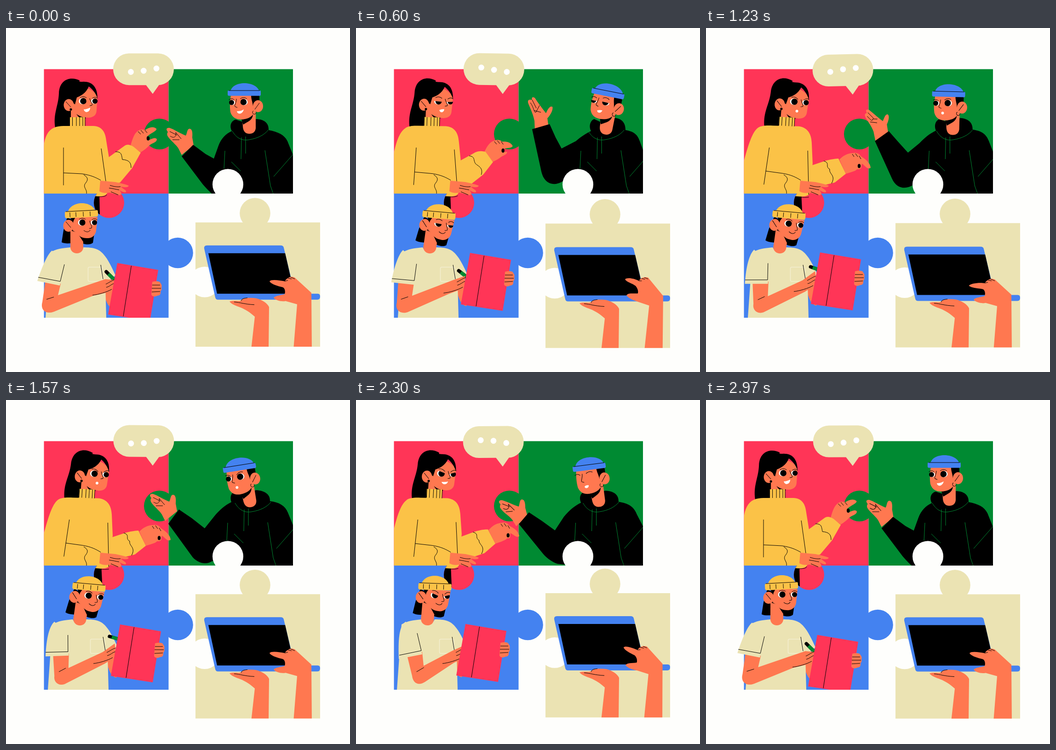
Animation, 748 px wide and 748 px high, one loop 3000 ms. Source, as an HTML page with a canvas:

```html
<!DOCTYPE html>
<html lang="en">
<head>
<meta charset="utf-8">
<title>Team puzzle</title>
<style>
html, body { margin: 0; width: 100%; height: 100%; overflow: hidden; background: #fefefc; }
canvas { display: block; }
</style>
</head>
<body>
<canvas id="stage" width="748" height="748"></canvas>
<script>
const g = document.getElementById('stage').getContext('2d');
const BG = '#fefefc', RED = '#ff3557', GREEN = '#008a32', BLUE = '#4482f0', BEIGE = '#ebe3b3',
  SKIN = '#ff7850', YELLOW = '#fbc247', BLACK = '#000', WHITE = '#fff';
const LOOP = 3000, TIMES = [0, 370, 870, 1570, 1970, 2530, LOOP];
let now = 0, step = 0, part = 0;

// Blend two numbers, or two path strings with the same commands.
function mix(a, b, w) {
  if (typeof a === 'number') return a + (b - a) * w;
  const to = b.match(/[\d.]+/g);
  let n = 0;
  return a.replace(/[\d.]+/g, x => (+x + (to[n++] - x) * w).toFixed(2));
}
// One value per key pose, blended at the current time.
const key = (...v) => mix(v[step], v[(step + 1) % 6], part);
const wave = (period, delay = 0) => Math.sin((now - delay) / period * 2 * Math.PI);

function fill(color, d) { g.fillStyle = color; g.fill(new Path2D(d)); }
function line(d, color = BLACK, width = 1) {
  g.strokeStyle = color;
  g.lineWidth = width;
  g.stroke(new Path2D(d));
}
function oval(color, x, y, rx, ry = rx) {
  g.fillStyle = color;
  g.beginPath();
  g.ellipse(x, y, rx, ry, 0, 0, 7);
  g.fill();
}
function box(color, x, y, w, h, r = 0) {
  g.fillStyle = color;
  g.beginPath();
  g.roundRect(x, y, w, h, r);
  g.fill();
}
function moved(dx, dy, draw, deg = 0, px = 0, py = 0) {
  g.save();
  g.translate(px + dx, py + dy);
  g.rotate(deg * Math.PI / 180);
  g.translate(-px, -py);
  draw();
  g.restore();
}
function within(d, draw) {
  g.save();
  g.clip(new Path2D(d));
  draw();
  g.restore();
}
function eye(x, y, r, open, slope, side = -2) {
  open = Math.max(0, Math.min(1, open));
  const top = y + r * (1.1 - 2.2 * open);
  if (open > .08) within(`M${x - 20} ${top - slope * 20}L${x + 20} ${top + slope * 20}V${y + 20}H${x - 20}Z`, () => {
    oval(WHITE, x + side, y, r * 1.05, r * .95);
    oval(BLACK, x, y, r * .95);
  });
  const lid = y - r - 2;
  line(`M${x - r} ${lid + 2 - slope * r}Q${x} ${lid - 3} ${x + r} ${lid + 2 + slope * r}`);
}

function panels() {
  box(RED, 82.5, 89.5, 271, 271);
  box(GREEN, 353.5, 89.5, 270.5, 270.5);
  box(BLUE, 82.5, 360, 271, 270);
  oval(GREEN, 333.5, 230.5, 33.5);
  oval(RED, 224, 380, 33);
  oval(BLUE, 373.5, 489, 33.3);
  box(RED, 190, 350, 70, 10);
}

function woman() {
  const lean = key(0, .06, .78, .8, 1, .35), reach = key(0, 0, 1, 1, 1, .85);
  const dx = 25.5 * lean, tilt = 6 * lean;
  const open = key(3, -1.5, 3, 1, .85, .65), slope = key(0, 0, .15, .3, .3, .35);
  const smile = 'M169 177C174 177 179 175 183 173C183 183 172 187 169 177Z',
    round = 'M172 179C172 175 178 175 178 179C178 183 172 183 172 179Z',
    flat = 'M169 177C174 178 179 180 183 180C179 182 173 181 169 177Z';

  within('M82.5 0H500V360H82.5ZM257 380A33 33 0 1 1 191 380A33 33 0 1 1 257 380Z', () => {
    // far arm
    fill(SKIN, mix(
      'M293 270L271 255C276 238 280 226 290 222C295 220 299 221 302 222C311 216 320 213 327 219C329 224 313 229 306 237L309 245C317 240 326 237 328 242C328 249 318 250 312 255C305 262 300 266 293 270Z',
      'M304 317L290 286C298 278 306 273 318 272C328 270 333 273 337 279C346 285 357 292 358 304C351 309 346 299 339 295L338 301C338 306 334 308 329 307C326 309 324 311 320 312C315 314 310 315 304 317Z', reach));
    oval(BLACK, mix(309, 333, reach), mix(240, 300, reach), 3.2, 4.5);
    line(mix('M287 225L293 231M293 222L299 229M302 222L307 228', 'M318 274L322 280M325 273L330 280M333 278L337 285', reach));
    fill(YELLOW, mix(
      'M222 282L258 256C264 252 270 254 277 258L293 271L274 305L248 336L216 345Z',
      'M226 300L262 288C275 285 282 284 288 284L304 317L280 336L255 342L216 340Z', reach));
    line(mix('M238 269C252 269 251 276 253 286C266 287 272 291 272 304', 'M256 289C271 294 258 301 269 307C267 318 283 320 273 338', reach));

    moved(dx, 0, () => {
      fill(BLACK, 'M160 114C140 104 116 112 115 142C114 170 102 186 107 217L142 214L155 160Z');
      fill(SKIN, 'M141 165V198H172L168 185Z');
      fill(BLACK, 'M153 187C160 192 168 195 174 195L166 201C161 196 156 192 153 187Z');
      fill(SKIN, 'M146 150V180C156 191 170 195 180 195C192 194 197 188 197 178L199 150C190 130 160 120 146 150Z');
      fill(BLACK, 'M130 160C124 130 140 114 165 117C186 115 199 127 199 153C195 141 188 133 180 127C174 142 162 148 154 151L150 166L141 160Z');
      oval(SKIN, 136.5, 167.5, 11, 13);
      line('M130 160L141 172');
      oval(BLACK, 141, 177, 2.6);
      eye(168, 159, 7.2, open, slope);
      eye(193.5, 159, 6, open, -slope);
      line('M182 153C183 160 189 164 187 168L182 169');
      fill(WHITE, key(smile, smile, round, round, flat, smile));
    }, tilt, 155, 210);

    // trousers and hem showing in the tab
    fill(BLACK, mix('M188 355H203L204 405H188Z', 'M188 355H208L211 408H188Z', lean));
    fill(YELLOW, mix('M190 350H220C224 362 214 368 194 366Z', 'M190 350H228C228 362 226 369 194 366Z', lean));
    line(mix('M194 366C210 368 218 366 219 362', 'M194 366C206 368 216 370 225 369', lean));

    fill(YELLOW, mix(
      'M82 258C84 236 92 222 104 217C110 214 118 213 125 213L190 213C208 214 216 225 218 245L224 282L217 360L82 360Z',
      'M82 300C95 255 103 230 113 219C118 212 135 211 150 212L205 214C222 217 232 228 233 250L234 298L226 360L82 360Z', lean));
    line(mix('M125 260L125 342M207 262L217 333', 'M141 260L126 340M225 268L225 370', lean));
    line(mix('M125 315L165 317C185 320 195 325 206 331', 'M131 310L168 316C185 319 195 324 206 331', lean));
    line('M169 319C178 325 179 329 174 336C165 346 177 350 175 360');

    fill(SKIN, 'M205 332L238 335C250 338 262 340 267 343C265 348 257 346 249 345L260 353C264 360 255 358 246 352C254 360 251 365 244 363L225 358C215 360 208 358 203 355Z');
    line('M226 342C235 345 241 346 249 345M224 348C232 349 240 351 246 352M228 356L244 363');

    moved(dx, 0, () => {
      box(YELLOW, 138, 194, 34, 20);
      line('M138.500 194V213M144.500 194V213M153 194V213M160 194V213M167 194V213M172 194V213');
    }, tilt * .7, 155, 210);
  });
}

function man() {
  const open = key(3, -1.5, 3, 1.3, 1, -1.5), slope = key(0, 0, -.1, .3, .3, 0);
  const palm = 'M382 276L408 255L405 238C406 228 405 219 399 219C394 219 394 228 391 234C380 230 365 220 355 217C349 217 347 220 352 226C348 232 352 236 356 241C362 248 370 254 375 262Z',
    raised = 'M386 232L417 228L413 199C420 192 426 180 424 174C418 171 413 181 410 188C404 180 392 165 386 155C381 151 378 154 380 159C372 157 369 160 372 168C377 180 382 190 385 205Z';
  const creases = 'M356 225L372 233M357 235C364 240 371 238 369 227L381 241M362 243L377 243',
    folds = 'M380 159L389 177M376 165C384 176 384 188 388 186L396 171M384 182L399 186';
  const low = 'M407 254L434 274L452 284L462 256C468 240 478 230 491 224C485 212 490 202 499 199L515 204L543 198C560 198 572 206 571 222C592 226 605 232 612 246L624 276L624 360L470 360L447 360C441 354 434 347 428 340L382 279Z',
    up = 'M421 209L434 238L447 262L478 246C490 236 497 231 511 224C505 212 511 200 518 198L531 204L556 195C574 195 586 202 586 222C605 225 612 232 617 246L624 265L624 360L488 360L460 325C445 342 412 350 403 312L383 220Z',
    far = 'M376 238L404 257L432 279L452 254C464 239 476 229 490 222C486 210 490 201 499 198L516 204L544 196C562 197 575 205 574 220C594 222 607 230 613 245L624 272L624 360L484 360L449 350C437 358 420 357 406 342L353 269Z',
    rest = 'M376 248L404 266L433 286L452 254C464 240 476 230 489 224C483 212 488 202 497 199L513 204L541 198C558 198 570 206 569 222C590 226 602 232 609 250L624 276L624 360L464 360L432 360C424 350 415 340 408 331L355 270Z';
  const smile = 'M502 181C508 181 512 180 517 177C515 187 504 190 502 181Z',
    round = 'M503 183C503 179 509 179 509 183C509 187 503 187 503 183Z';

  within('M0 0H624V360H0Z', () => {
    moved(key(0, 0, 7, -36, -39, -34), key(0, 0, -6, -13, -6, 0), () => {
      fill(SKIN, key(palm, raised, raised, palm, palm, palm));
      line(key(creases, folds, folds, creases, creases, creases));
    }, key(0, 0, 0, 0, -8, -3), 390, 250);
    fill(BLACK, key(low, up, up, far, far, rest));
    moved(key(0, 13, 13, 6, 6, -1), 0, () => {
      line('M563 266L575 343L581 360M624 275L582 323M476 267L474 306M490 291L510 311M512 238L511 285M521 236V273', GREEN);
      line('M492 224C500 238 512 246 528 243C548 240 562 232 570 222', GREEN);
    });

    moved(key(0, 15, 15, 1, 1, -3), key(0, 2, 2, 3, 3, 2), () => {
      fill(SKIN, 'M514 195L515 215C516 226 522 230 529 230C537 230 542 226 543 218V180Z');
      fill(BLACK, 'M512 199C525 198 533 194 537 188C536 201 525 204 516 210Z');
      fill(SKIN, 'M489 145C487 160 486 170 488 183C492 195 500 199 512 199C525 197 535 190 541 182L552 145Z');
      fill(BLACK, 'M533 146H551V160H543L537 170C536 160 533 155 533 146Z');
      oval(SKIN, 548, 170, 11, 13);
      line('M541 177L551 163M538 180A4 4 0 1 0 544 184');
      eye(490.5, 162, 5.8, open, slope, 1.5);
      eye(516.5, 161, 7.2, open, -slope, 1.5);
      line('M501 154C501 163 496 168 498 171L503 173');
      fill(WHITE, key(smile, smile, round, round, smile, round));
      fill(BLUE, 'M488 138C492 114 544 114 551 138Z');
      box(BLUE, 482, 135.5, 72, 12, 3);
      line('M484 136H552');
    }, key(0, 10, 13, -9, -10, -6), 530, 215);
  });
  oval(BG, 482.5, 340, 33.5);
}

function writer() {
  const dx = key(0, 5, 5, 5, 3, 3);
  const open = key(3, -1.5, 3, 1.1, .7, .55), slope = key(0, 0, .1, .15, .35, .35);
  const wide = 'M86 548L119 556L113 581L216 546L236 548L234 572L190 582L104 617C88 623 74 614 79 596Z',
    tucked = 'M100 550L135 552L133 584L210 549L238 528L242 556L215 574L122 619C108 623 98 612 101 600Z',
    close = 'M111 555L144 548L147 578L212 544L230 536L232 562L212 572L150 613C136 622 124 616 122 600Z';
  const cuffWide = 'M100 484C90 492 78 520 68 550L117 560L129 512Z',
    cuffTucked = 'M104 482C94 492 86 520 83 555L133 557L136 512Z',
    cuffClose = 'M108 482C96 490 91 510 93 563L144 553L133 507Z';
  const seamWide = 'M70 542L118 551L127 514', seamTucked = 'M84 547L133 548L135 512',
    seamClose = 'M94 555L142 545L133 507';

  within('M0 360H748V630H0Z', () => {
    const bx = key(-6, 0, 0, 0, -10, -10), by = key(21, 0, -2, -2, -3, -3);
    moved(bx, Math.min(by, 5), () => fill(SKIN, 'M220 565L245 560L240 606C230 604 224 592 220 576Z'));
    moved(dx, 0, () => {
      fill(BEIGE, 'M86 630L92 545L96 488C110 480 120 479 140 477C146 490 162 491 168 477C190 477 202 480 212 492C222 503 230 520 238 538L216 556L218 630Z');
      g.strokeStyle = '#f3eecf';
      g.lineWidth = 1.5;
      g.beginPath();
      g.roundRect(178.5, 520, 31, 31, 3);
      g.stroke();
      line('M206 515L211 546');
    });

    // pen, arm and sleeve
    const x1 = key(218, 218, 230, 225, 240, 240), y1 = key(530, 530, 525, 514, 520, 520);
    const x2 = key(237, 237, 246, 245, 256, 256), y2 = key(549, 549, 532, 520, 525, 525);
    g.lineCap = 'round';
    line(`M${x1} ${y1}L${x2} ${y2}`, BLACK, 7.5);
    g.lineCap = 'butt';
    line(`M${mix(x1, x2, .25)} ${mix(y1, y2, .25)}L${x2} ${y2}`, GREEN, 7.5);
    fill(SKIN, key(wide, wide, tucked, mix(tucked, close, .2), close, close));
    line(key('M88 590L104 585', 'M88 589L104 584', 'M110 591L125 585', 'M115 591L130 583', 'M131 591L147 581', 'M132 591L148 582'));
    moved(key(0, 1, 4, 2, 0, 0), key(0, -2, -8, -8, -8, -8), () =>
      line('M217 557C224 554 231 548 238 547M218 564C226 562 229 557 236 555M188 581C200 580 220 574 230 568'));
    fill(BEIGE, key(cuffWide, mix(cuffWide, cuffTucked, .25), cuffTucked, mix(cuffTucked, cuffClose, .3), cuffClose, cuffClose));
    line(key(seamWide, mix(seamWide, seamTucked, .25), seamTucked, mix(seamTucked, seamClose, .2), seamClose, seamClose));

    moved(bx, by, () => {
      fill(RED, 'M248 490L337 505L319 616L228 602Z');
      line('M278.500 496L261 606');
      fill(SKIN, 'M324 531C332 529 341 529 342 534C345 537 345 541 344 543C345 547 344 550 342 551C343 558 340 561 335 561C330 564 324 563 322 559Z');
      line('M324 538H341M323 545H343M323 553L341 552');
    });

    moved(key(0, 6, 6, 6, 1, 1), 0, () => {
      fill(BLACK, 'M133 412L125 440L121 466C130 470 140 468 152 467L168 469C178 472 186 470 189 467L193 440Z');
      fill(SKIN, 'M140 440V478C142 494 166 494 168 478V465L155 445Z');
      fill(SKIN, 'M147 411H199L196 440C195 452 185 458 176 457C165 457 158 452 155 447L145 440Z');
      fill(BLACK, 'M138 411H151L146 421Z');
      oval(SKIN, 136, 430, 11.5, 13);
      line('M130 421L141 434');
      eye(166, 423, 7, open, slope);
      eye(192.5, 423, 5.8, open, -slope);
      line('M182 419C183 427 188 431 186 435L181 436M169 440C175 445 181 444 183 439');
      moved(0, 0, () => {
        fill(YELLOW, 'M134 402C138 374 190 374 195 402Z');
        box(YELLOW, 128, 397, 72, 15, 4);
        line('M130 397.500H198M139 400V410M152 400V410M168 400V410M183 400V410');
      }, -3, 164, 404);
    }, key(0, 8, 8, 8, 5, 5), 153, 480);
  });
}

function laptop() {
  const down = 'M625 700L633 601L608 594C598 596 586 592 582 587C586 582 596 582 606 579C608 572 606 566 602 564C592 562 576 557 573 551C577 546 595 549 606 551C612 542 620 539 628 543L664 576L665 700Z',
    lifted = 'M628 700L641 597L618 588C606 580 595 574 593 568C597 562 606 566 618 567C620 562 616 556 613 550C606 540 597 532 597 525C602 521 613 532 622 540C626 535 634 532 641 534L671 579L668 700Z';
  const pressed = down.replace('576 557 573 551C577 546', '576 567 570 562C574 557');
  const bent = 'M606 551L613 549M612 544L621 546M619 542L628 546', raised = 'M622 540L628 542M627 536L634 538M633 534L641 537';

  moved(0, 2.8 * wave(LOOP) - .3, () => {
    oval(BEIGE, 541.5, 403, 33.3);
    box(BEIGE, 412, 423, 271, 270.3);
    within('M412 423H683V693.300H412Z', () => {
      oval(BG, 432, 552.5, 33.3);
      moved(0, key(0, 0, 2.6, 0, 0, .3), () => {
        fill(BLUE, 'M431 480Q430 473 437 473H597Q603 473 604 478L628 578H678Q683 578 683 584Q683 591 677 591H461Q456 591 455 586Z');
        fill(BLACK, 'M440 490H607L627 578H459Z');
        fill(SKIN, 'M486 595C495 592 505 595 511 593C514 587 530 586 544 588C556 591 568 598 572 607L571 700H533L541 628C530 618 520 612 510 608C500 604 490 601 486 595Z');
        line('M496 596C510 597 518 601 540 602M511 594C513 588 518 588 525 587');
        moved(0, key(0, 0, 3, 0, 0, -1), () => {
          fill(SKIN, key(down, lifted, pressed, down, lifted, down));
          line(key(bent, raised, bent, bent, raised, bent));
        });
      });
    });
  });
}

function bubble() {
  moved(0, .8 - 1.5 * wave(1500, -100), () => {
    box(BEIGE, 233, 55, 132, 69, 34.5);
    fill(BEIGE, 'M303 122H334L319 143Z');
    for (let i = 0; i < 3; i++) oval(WHITE, 271.5 + 27.8 * i, 90.3 + 5 * wave(1500, 250 * i - 375), 6.4);
  }, 1.6 * wave(1500), 319, 143);
}

function frame() {
  now = performance.now() % LOOP;
  step = TIMES.findIndex(t => t > now) - 1;
  const p = (now - TIMES[step]) / (TIMES[step + 1] - TIMES[step]);
  part = p * p * (3 - 2 * p);
  g.fillStyle = BG;
  g.fillRect(0, 0, 748, 748);
  panels();
  woman();
  man();
  writer();
  laptop();
  bubble();
  requestAnimationFrame(frame);
}
frame();
</script>
</body>
</html>
```
